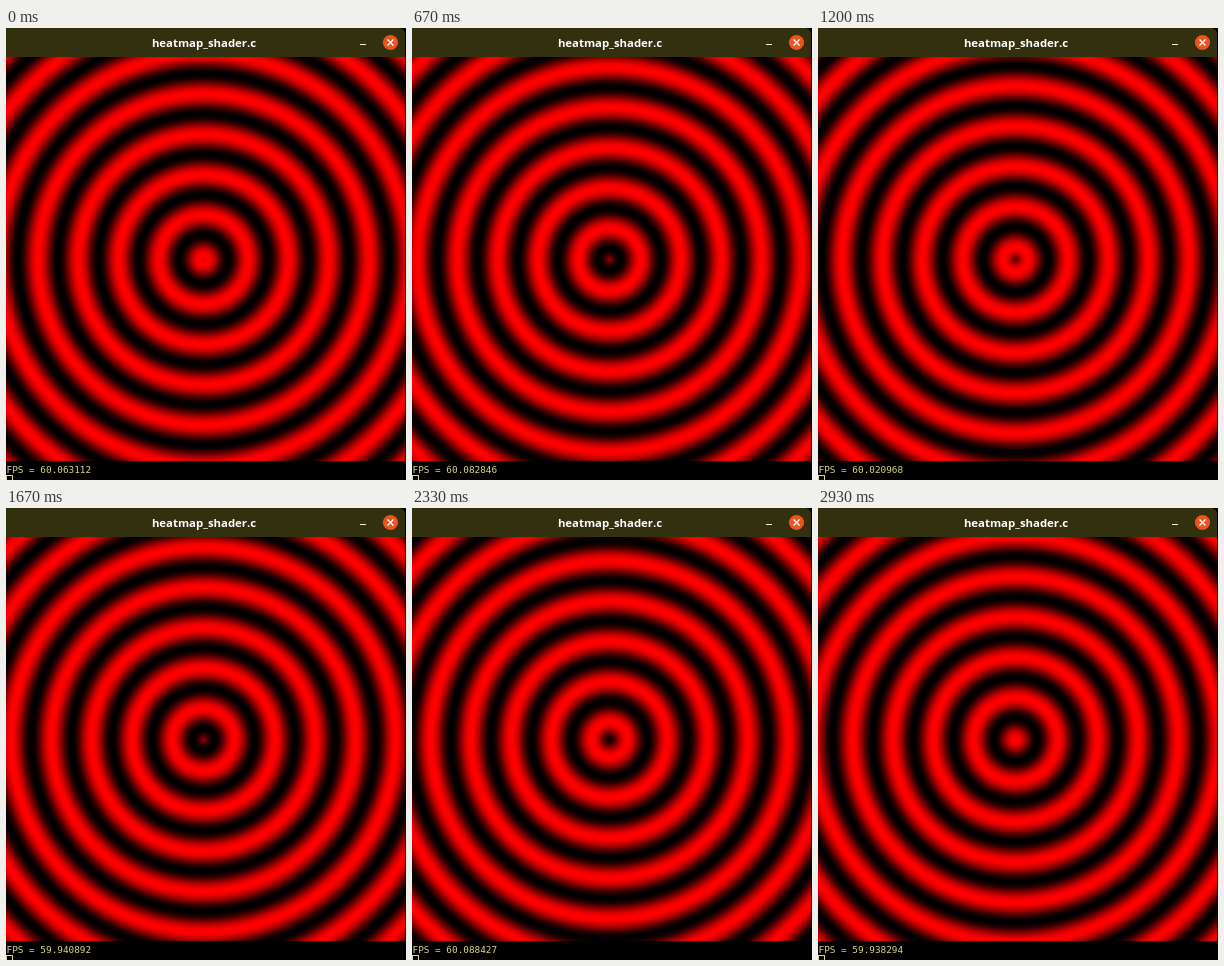
An HTML page with a canvas for the animation above (2990 ms loop, 400 px wide and 452 px high).

```html
<!DOCTYPE html>
<html lang="en">
<head>
<meta charset="utf-8">
<title>heatmap_shader.c</title>
<style>
  html, body { margin: 0; width: 100%; height: 100%; overflow: hidden; background: #000; }
  canvas { display: block; width: 400px; height: 452px; }
</style>
</head>
<body>
<canvas id="stage" width="400" height="452"></canvas>
<script>
const ctx = document.getElementById('stage').getContext('2d');
const LOOP = 2990, FPS = 15, FRAMES = 45;
const VIEW = { y: 29, w: 399, h: 404 };
const CENTER = { x: 197, y: 231 };
const WAVELENGTH = 40.3, START = 4.3;
const INK = '#d8d68a';

// [time in ms, printed rate]
const readings = [
  [0, '60.063112'], [640, '60.082846'], [1130, '60.020968'],
  [1640, '59.940892'], [2130, '60.088427'], [2640, '59.938294']
];

const pixels = ctx.createImageData(VIEW.w, VIEW.h);
const radius = new Float32Array(VIEW.w * VIEW.h);
for (let i = 0; i < radius.length; i++) {
  const x = i % VIEW.w, y = Math.floor(i / VIEW.w) + VIEW.y;
  radius[i] = Math.hypot(x - CENTER.x, y - CENTER.y);
  pixels.data[i * 4 + 3] = 255;
}

function stepAt(ms) {
  let i = FRAMES - 1;
  while (i > 0 && Math.round(i * 100 / FPS) * 10 > ms) i--;
  return i;
}

function drawRings(seconds) {
  const shift = START + WAVELENGTH * seconds;
  const k = 2 * Math.PI / WAVELENGTH;
  for (let i = 0; i < radius.length; i++) {
    pixels.data[i * 4] = 127.5 + 127.5 * Math.cos((radius[i] - shift) * k);
  }
  ctx.putImageData(pixels, 0, VIEW.y);
}

function line(x1, y1, x2, y2) {
  ctx.beginPath();
  ctx.moveTo(x1, y1);
  ctx.lineTo(x2, y2);
  ctx.stroke();
}

function drawTitleBar() {
  ctx.fillStyle = '#33300f';
  ctx.beginPath();
  ctx.roundRect(0, 0, 399, VIEW.y, [0, 6, 0, 0]);
  ctx.fill();

  ctx.fillStyle = '#fff';
  ctx.font = 'bold 11.4px "Open Sans", "Noto Sans", sans-serif';
  ctx.textAlign = 'center';
  ctx.fillText('heatmap_shader.c', 198, 19);

  ctx.strokeStyle = '#f0eedc';
  ctx.lineWidth = 1;
  line(354, 16.5, 360, 16.5);

  ctx.fillStyle = '#ea5420';
  ctx.beginPath();
  ctx.arc(384.5, 14.5, 7.6, 0, 2 * Math.PI);
  ctx.fill();
  ctx.strokeStyle = '#fff';
  ctx.lineWidth = 1.2;
  line(381.5, 11.5, 387.5, 17.5);
  line(387.5, 11.5, 381.5, 17.5);
}

function drawTerminal(ms) {
  const rate = readings.filter(r => r[0] <= ms).pop()[1];
  ctx.fillStyle = ctx.strokeStyle = INK;
  ctx.font = '9.4px "DejaVu Sans Mono", monospace';
  ctx.textAlign = 'left';
  ctx.fillText('FPS = ' + rate, 0.5, 445);
  ctx.lineWidth = 1;
  ctx.strokeRect(0.5, 447.5, 6, 10);
}

function draw(now) {
  const step = stepAt(now % LOOP);
  ctx.fillStyle = '#000';
  ctx.fillRect(0, 0, 400, 452);
  drawRings(step / FPS);
  drawTitleBar();
  drawTerminal(step * 1000 / FPS);
}

function tick(now) {
  draw(now);
  requestAnimationFrame(tick);
}

draw(0);
requestAnimationFrame(tick);
</script>
</body>
</html>
```
